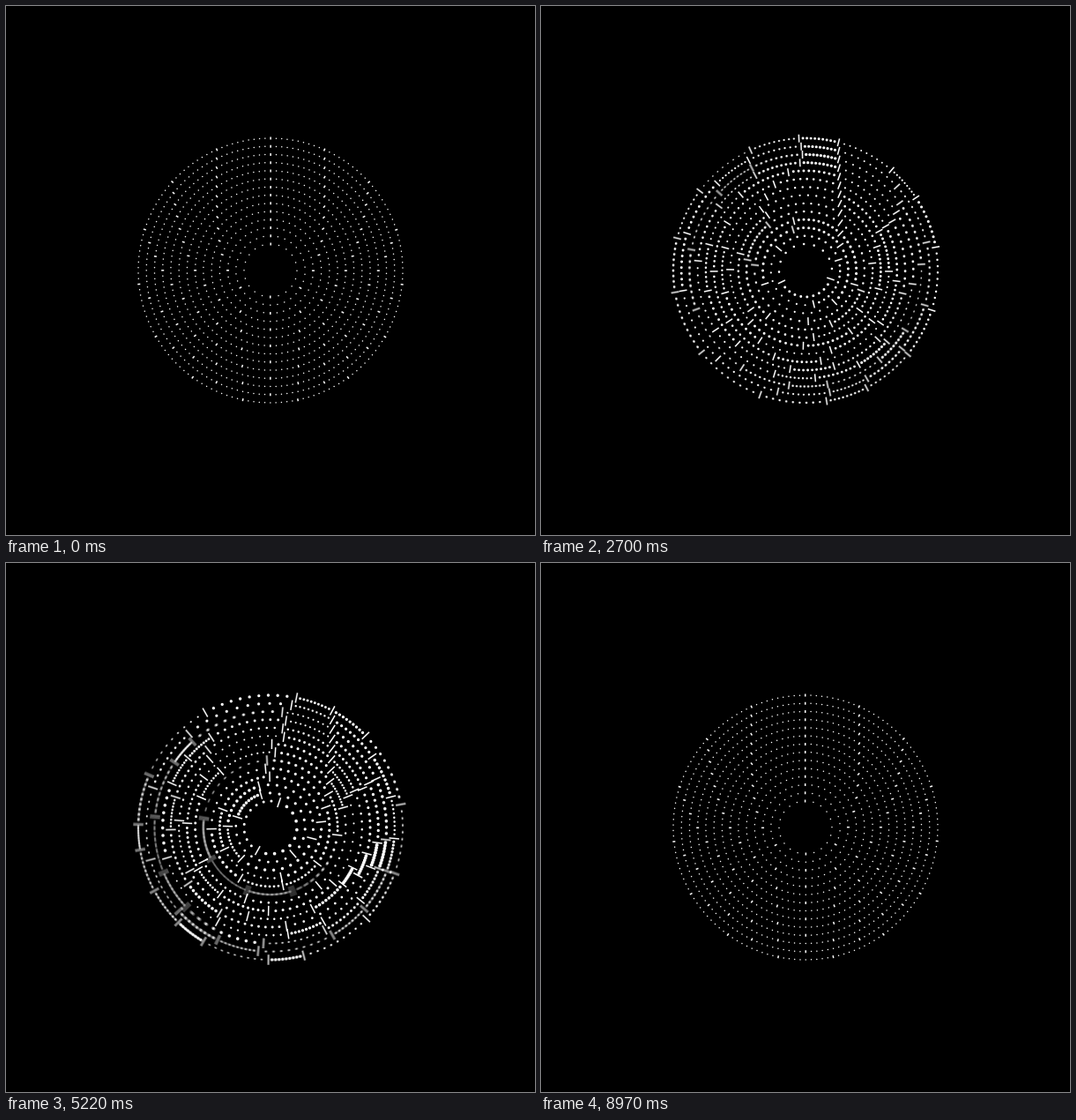
Write an HTML page with a canvas that moves like this. It is 600x600 px and loops after 9000 ms.

```html
<!DOCTYPE html>
<html lang="en">
<head>
<meta charset="utf-8">
<title>Shifting rings</title>
<style>
  html, body { margin: 0; width: 100%; height: 100%; overflow: hidden; background: #000; }
  canvas { display: block; width: 600px; height: 600px; }
</style>
</head>
<body>
<canvas id="stage" width="600" height="600"></canvas>
<script>
const ctx = document.getElementById('stage').getContext('2d');
const TAU = Math.PI * 2;
const LOOP = 9000, STEP = 30;
const RINGS = 14, INNER = 30, OUTER = 150;
const PARTS = 10;            // intervals between two neighbouring ticks
const CELL = 42;             // grain of the random field, in pixels
const SAMPLES = 8, SHUTTER = 26;

const mix = (a, b, t) => a + (b - a) * t;
const smooth = t => t * t * (3 - 2 * t);

function hash(a, b, c) {
  let h = Math.imul(a + 17, 374761393) ^ Math.imul(b + 71, 668265263) ^ Math.imul(c + 5, 1274126177);
  h = Math.imul(h ^ (h >>> 15), 2246822519);
  h = Math.imul(h ^ (h >>> 13), 3266489917);
  return ((h ^ (h >>> 16)) >>> 0) / 4294967296;
}

// Smooth random field over the plane, 0..1, one per layer.
function field(x, y, layer) {
  const u = x / CELL + 40, v = y / CELL + 40;
  const i = Math.floor(u), j = Math.floor(v);
  const p = smooth(u - i), q = smooth(v - j);
  return mix(
    mix(hash(i, j, layer), hash(i + 1, j, layer), p),
    mix(hash(i, j + 1, layer), hash(i + 1, j + 1, layer), p), q);
}

// Holds a random level in -1..1, then glides quickly to the next one.
function level(seg, ms, layer, slot, glide) {
  const u = ms / slot + 2 * seg.delay;
  const k = Math.floor(u);
  const t = Math.max(0, (u - k - 1) * slot / glide + 1);
  const a = field(seg.x, seg.y, layer + k);
  const b = t ? field(seg.x, seg.y, layer + k + 1) : a;
  return mix(a, b, smooth(t)) * 2 - 1;
}

const rings = Array.from({ length: RINGS }, (_, n) => {
  const radius = mix(INNER, OUTER, n / (RINGS - 1));
  const segs = Array.from({ length: n + 2 }, (_, i) => {
    const a = TAU * (i + 0.5) / (n + 2) - Math.PI / 2;
    const x = Math.cos(a) * radius, y = Math.sin(a) * radius;
    return { x, y, delay: field(x, y, 900) };
  });
  return { radius, segs };
});

function drawRing({ radius, segs }, ms) {
  const phase = ms / LOOP;
  const swell = Math.sin(Math.PI * phase) ** 2;
  const spread = 1.15 * swell * swell;

  const levels = segs.map(s => level(s, ms, 100, 2000, 380));
  const weights = levels.map(v => Math.exp(spread * v));
  const total = weights.reduce((a, b) => a + b);

  const half = 1.5 + 4.5 * swell;
  let angle = TAU * 2 * phase / segs.length - Math.PI / 2;
  segs.forEach((seg, i) => {
    const c = Math.cos(angle), s = Math.sin(angle);
    ctx.beginPath();
    ctx.moveTo(c * (radius - half), s * (radius - half));
    ctx.lineTo(c * (radius + half), s * (radius + half));
    ctx.stroke();

    const span = TAU * weights[i] / total;
    const size = 0.5 + 0.5 * level(seg, ms, 300, 2600, 900) - 0.25 * levels[i];
    const dot = 0.75 + swell * (0.1 + 1.2 * Math.max(0, size));
    ctx.beginPath();
    for (let j = 1; j < PARTS; j++) {
      const a = angle + span * j / PARTS;
      const x = Math.cos(a) * radius, y = Math.sin(a) * radius;
      ctx.moveTo(x + dot, y);
      ctx.arc(x, y, dot, 0, TAU);
    }
    ctx.fill();
    angle += span;
  });
}

function draw(ms) {
  ctx.setTransform(1, 0, 0, 1, 0, 0);
  ctx.globalAlpha = 1;
  ctx.globalCompositeOperation = 'source-over';
  ctx.fillStyle = '#000';
  ctx.fillRect(0, 0, 600, 600);

  ctx.translate(300, 300);
  ctx.globalCompositeOperation = 'lighter';
  ctx.globalAlpha = 1 / SAMPLES;
  ctx.fillStyle = ctx.strokeStyle = '#fff';
  ctx.lineWidth = 1.5;
  for (let n = 0; n < SAMPLES; n++) {
    const at = ms + SHUTTER * n / SAMPLES;
    rings.forEach(ring => drawRing(ring, at));
  }
}

let start = null, shown = -1;
function tick(now) {
  if (start === null) start = now;
  const ms = Math.floor(((now - start) % LOOP) / STEP) * STEP;
  if (ms !== shown) draw(shown = ms);
  requestAnimationFrame(tick);
}
draw(0);
requestAnimationFrame(tick);
</script>
</body>
</html>
```
